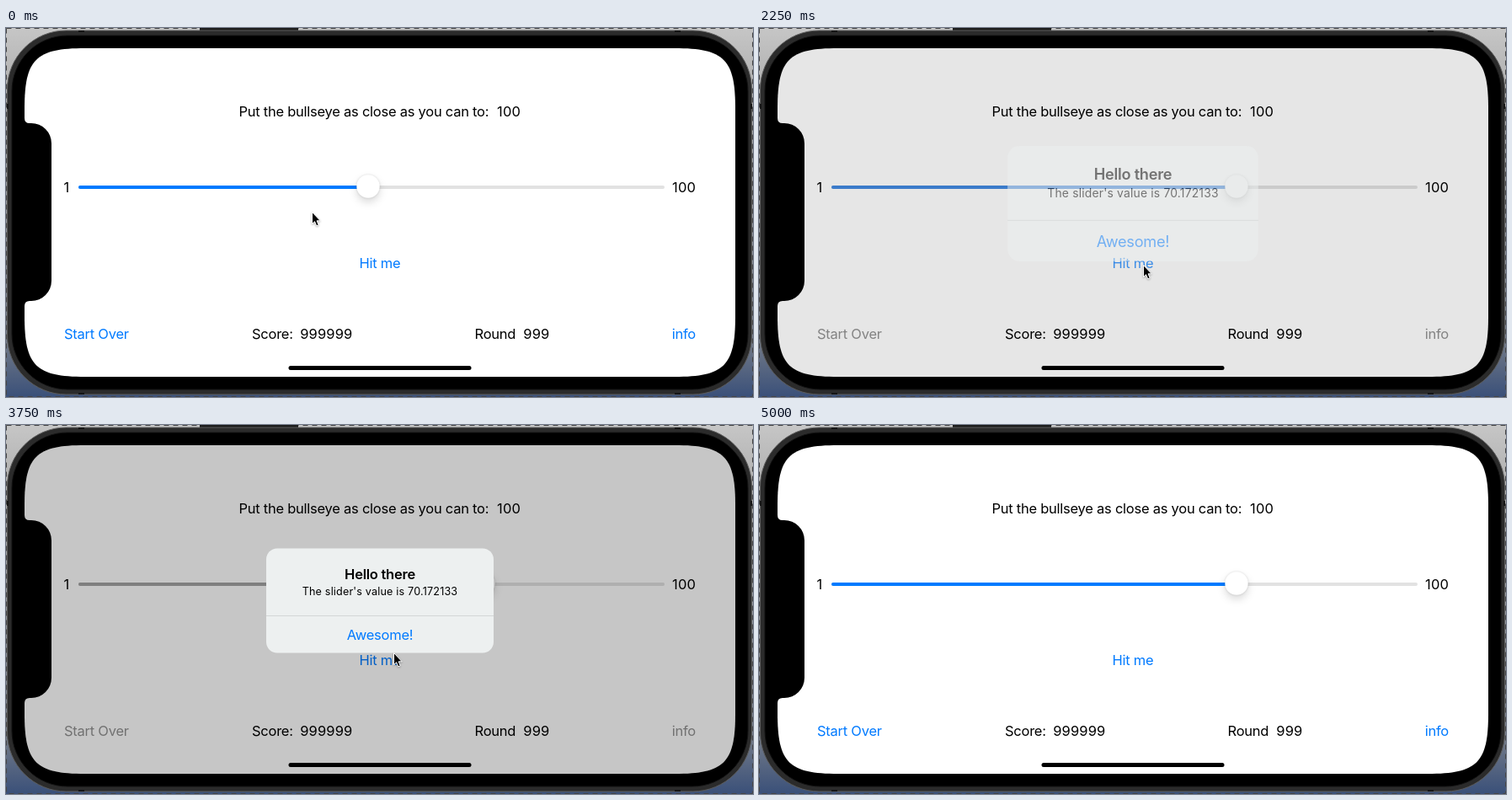
These frames come from a looping animation (887x438 px, 6 s). An HTML page:

```html
<!DOCTYPE html>
<html lang="en">
<head>
<meta charset="utf-8">
<title>Bullseye slider</title>
<style>
  html, body { margin: 0; width: 100%; height: 100%; overflow: hidden; background: #000; }
  svg { display: block; width: 100%; height: 100%; }
  text { font: 16.5px Inter, "Open Sans", sans-serif; letter-spacing: -.25px; white-space: pre; }
  .mid { text-anchor: middle; }
  .end { text-anchor: end; }
  .num { letter-spacing: .15px; }
  .tint { fill: #007aff; }
  .title { font-weight: 600; }
  .message { font-size: 12.6px; letter-spacing: .17px; }

  .slide, .link, .bar, #hit, #dim, #alert, #cursor { animation: 6s step-end infinite; }
  .slide { animation-name: slide; }
  .link { animation-name: link; }
  .bar { animation-name: bar; }
  #hit { animation-name: press; }
  #dim { animation-name: dim; }
  #alert { animation-name: alert; transform-origin: 444px 208.5px; }
  #cursor { animation-name: cursor; }
  .knob { filter: drop-shadow(0 .5px 1.5px rgba(0,0,0,.14)) drop-shadow(0 5px 5px rgba(0,0,0,.14)); }

  @keyframes slide {
    0% { transform: translate(430px, 188px); }
    12.5% { transform: translate(455px, 188px); }
    16.666% { transform: translate(548px, 188px); }
    20.833% { transform: translate(563px, 188px); }
    25%, 100% { transform: translate(567px, 188px); }
  }
  @keyframes link {
    0%, 66.666%, 100% { fill: #007aff; }
    37.5% { fill: #929292; }
  }
  @keyframes bar {
    0%, 70.833%, 100% { fill: #007aff; }
    37.5% { fill: #4289e0; }
    41.666% { fill: #a4a4a4; }
    66.666% { fill: #2d84f0; }
  }
  @keyframes press {
    0%, 41.666%, 100% { opacity: 1; }
    37.5% { opacity: .75; }
  }
  @keyframes dim {
    0%, 70.833%, 100% { opacity: 0; }
    37.5% { opacity: .1; }
    41.666% { opacity: .225; }
    66.666% { opacity: .067; }
  }
  @keyframes alert {
    0%, 70.833%, 100% { opacity: 0; transform: none; }
    37.5% { opacity: .5; transform: scale(1.103); }
    41.666% { opacity: 1; transform: none; }
    66.666% { opacity: .35; transform: none; }
  }
  @keyframes cursor {
    0% { transform: translate(363px, 218px); opacity: 1; }
    4.166% { transform: translate(427px, 198px); }
    8.333% { transform: translate(430px, 200px); }
    12.5% { transform: translate(453px, 201px); }
    16.666% { transform: translate(548px, 201px); }
    20.833% { transform: translate(563px, 201px); }
    25% { transform: translate(535px, 220px); }
    29.166% { transform: translate(463px, 271px); }
    33.333% { transform: translate(456px, 281px); }
    41.666% { transform: translate(529px, 233px); }
    45.833% { transform: translate(465px, 215px); }
    54.166% { transform: translate(464px, 215px); }
    58.333% { transform: translate(457px, 274px); }
    62.5% { transform: translate(460px, 270px); }
    66.666% { transform: translate(461px, 267px); }
    70.833% { transform: translate(440px, 258px); }
    75% { transform: translate(365px, 220px); opacity: 1; }
    83.333%, 100% { transform: translate(365px, 220px); opacity: 0; }
  }
</style>
</head>
<body>
<svg viewBox="0 0 887 438" preserveAspectRatio="none">
  <defs>
    <linearGradient id="desk" x2="0" y2="1">
      <stop offset="0" stop-color="#c6c6c6"/>
      <stop offset=".2" stop-color="#aaa"/>
      <stop offset=".85" stop-color="#727a88"/>
      <stop offset="1" stop-color="#3a5079"/>
    </linearGradient>
    <clipPath id="track"><rect x="86" y="187" width="696" height="4" rx="2"/></clipPath>
    <path id="screen" d="M22 96C22 37 35 24 94 24H794C853 24 866 37 866 96V342C866 401 853 414 794 414H94C35 414 22 401 22 342Z"/>
  </defs>

  <!-- desktop edge and phone body -->
  <rect width="887" height="438" fill="url(#desk)"/>
  <rect x=".5" y=".5" width="886" height="437" fill="none" stroke="#444" stroke-dasharray="6 5"/>
  <rect x="230" width="117" height="4" fill="#1c1c1c"/>
  <rect x="1.5" y="3" width="884" height="432" rx="70" fill="#2b2b2b" stroke="#5c5c5c"/>
  <rect x="7" y="9" width="874" height="420" rx="66" stroke="#111"/>
  <path d="M86 4h7M86 434h7M794 4h7M794 434h7M2 90v6M885 90v6" stroke="#151515" stroke-width="2"/>

  <!-- screen -->
  <use href="#screen" fill="#fff"/>
  <text x="276.5" y="105">Put the bullseye as close as you can to:</text>
  <text x="611" y="105" class="end num">100</text>

  <text x="68.5" y="195">1</text>
  <text x="819" y="195" class="end num">100</text>
  <g clip-path="url(#track)">
    <rect x="86" y="187" width="696" height="4" fill="#e2e2e2"/>
    <g class="slide"><rect class="bar" x="-700" y="-2" width="700" height="6"/></g>
  </g>
  <g class="slide"><circle class="knob" r="13.7" fill="#fff"/></g>

  <text id="hit" x="444" y="284.5" class="mid tint">Hit me</text>
  <text x="69" y="369" class="link">Start Over</text>
  <text x="292" y="369">Score:</text>
  <text x="411.5" y="369" class="end num">999999</text>
  <text x="556.5" y="369">Round</text>
  <text x="645.5" y="369" class="end num">999</text>
  <text x="819" y="369" class="end link">info</text>
  <rect x="335.5" y="401" width="217" height="5" rx="2.5"/>

  <use id="dim" href="#screen"/>
  <path d="M21 107H22Q22 113 28 113H30A24 24 0 0 1 54 137V300A24 24 0 0 1 30 324H28Q22 324 22 330H21Z"/>

  <!-- alert -->
  <g id="alert">
    <rect x="309" y="146.5" width="270" height="124" rx="13" fill="#edf0f0"/>
    <path d="M309 226.5H579" stroke="#d3d6d6"/>
    <text x="444" y="182.5" class="mid title">Hello there</text>
    <text x="444" y="202" class="mid message">The slider's value is 70.172133</text>
    <text x="444" y="255" class="mid tint">Awesome!</text>
  </g>

  <g id="cursor">
    <path d="M.5 .5V14.6L3.6 11.7 5.7 16.8 8.2 15.8 6.1 10.8H10.2Z" stroke="#fff" stroke-width="1"
      style="filter: drop-shadow(0 1px 1px rgba(0,0,0,.3))"/>
  </g>
</svg>
</body>
</html>
```
